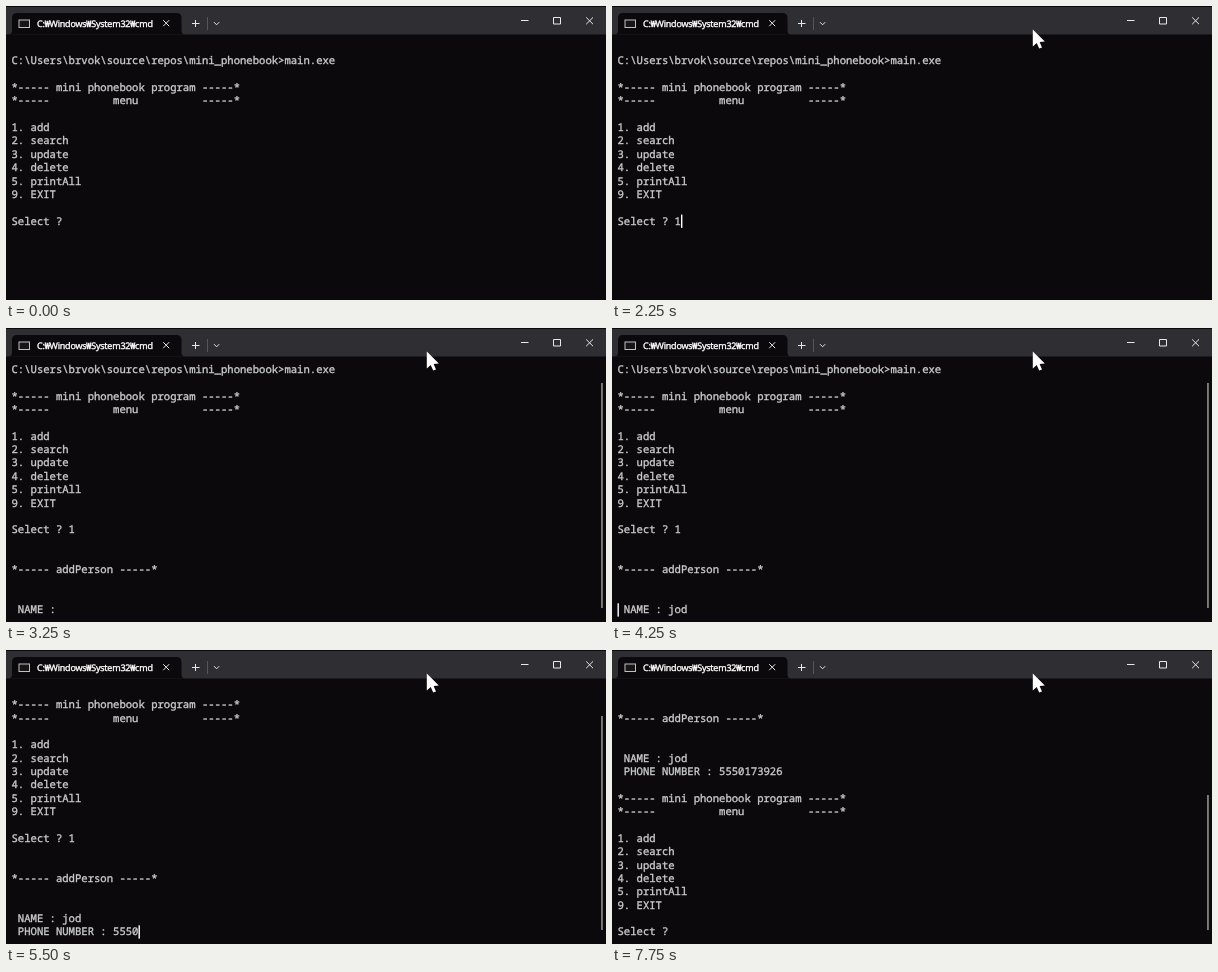
An HTML page that plays this animation: 600 by 294 pixels, repeating every 8000 ms.

```html
<!DOCTYPE html>
<html lang="en">
<head>
<meta charset="utf-8">
<title>Phonebook console</title>
<style>
  html, body { margin: 0; width: 100%; height: 100%; overflow: hidden; background: #0b090c; }
  svg { display: block; width: 600px; height: 294px; }
  text { white-space: pre; text-rendering: geometricPrecision; }
  #rows { font: 10.583px "Noto Sans Mono", "DejaVu Sans Mono", monospace; fill: #ccc; stroke: #ccc; stroke-width: .35; }
  #title { font: 9px "Open Sans", "Noto Sans CJK KR", "Noto Sans CJK", sans-serif; letter-spacing: -0.19px; fill: #fff; stroke: #fff; stroke-width: .4; }
  .line { fill: none; stroke: #e8e8e8; stroke-width: 1; }
</style>
</head>
<body>
<svg viewBox="0 0 600 294">
  <rect width="600" height="294" fill="#0b090c"/>
  <rect y="1" width="600" height="27.5" fill="#2f2e32"/>
  <path d="M2 28.5q4 0 4-4V12q0-5 5-5H170.5q5 0 5 5V24.5q0 4 4 4z" fill="#0b090c"/>
  <rect x="13" y="14" width="10.5" height="7.5" fill="#161616" stroke="#c0c0c0"/>
  <text id="title" x="31" y="20.7">C:₩Windows₩System32₩cmd</text>
  <path class="line" d="M157.2 14.2l6 6m0-6l-6 6M186 17.5h7.5M189.5 14v7M208 16.2l2.6 2.6l2.6-2.6"/>
  <path d="M201.5 11v13" stroke="#56555a"/>
  <path class="line" d="M515 14.5h7.5M547.5 11.5h7v6.5h-7zM580.2 11.4l6.8 6.8m0-6.8l-6.8 6.8"/>
  <g id="rows"></g>
  <rect id="bar" x="595.2" width="1.5" fill="#9c9c90"/>
  <rect id="caret" width="1.4" height="13.3" fill="#fff"/>
  <path id="mouse" d="M-.2-.4V16.6L3.7 13L6.2 18.6L9 17.4L6.6 12L11.8 11.6z" fill="#fff"/>
</svg>
<script>
  const LOOP = 8000, ROWS = 19, LEFT = 5.5, CELL_W = 6.35, CELL_H = 13.35, TOP = 35;
  const BASELINE = 10, BAR_END = 280;
  const person = 'jod', phone = '5550173926';
  const $ = id => document.getElementById(id);

  const menu = [
    '*----- mini phonebook program -----*',
    '*-----          menu          -----*',
    '', '1. add', '2. search', '3. update', '4. delete', '5. printAll', '9. EXIT', ''
  ];

  // Each cue changes part of the state; last = newest buffer line, caret = its column
  const cues = [
    [0, { last: 13, pick: '', name: 0, digits: 0, caret: null, mouse: null, bar: null }],
    [380, { caret: 9 }],
    [630, { mouse: [438, 18] }],
    [750, { mouse: [437, 20] }],
    [880, { mouse: [433, 22] }],
    [1000, { caret: null }],
    [1130, { mouse: [428, 24] }],
    [1250, { mouse: [421, 24] }],
    [1500, { caret: 9 }],
    [2000, { caret: null }],
    [2250, { pick: '1', caret: 10 }],
    [2380, { mouse: null }],
    [2630, { last: 19, caret: 8, bar: 55 }],
    [2750, { mouse: [421, 24] }],
    [3250, { caret: null }],
    [3880, { name: 1, caret: 9 }],
    [4000, { name: 2, caret: 10 }],
    [4130, { name: 3, caret: 11 }],
    [4250, { caret: 0 }],
    [4380, { last: 20, caret: 16, bar: 66 }],
    ...[4880, 5130, 5250, 5500, 5750, 6000, 6130, 6250].map((t, i) => [t, { digits: i + 1, caret: 17 + i }]),
    [6380, { digits: 10, caret: 26 }],
    [7000, { caret: null }],
    [7130, { last: 32, caret: 9, bar: 145 }],
    [7750, { caret: null }]
  ];

  const rows = Array.from({ length: ROWS }, (_, i) => {
    const row = document.createElementNS('http://www.w3.org/2000/svg', 'text');
    row.setAttribute('x', LEFT);
    row.setAttribute('y', TOP + BASELINE + i * CELL_H);
    return $('rows').appendChild(row);
  });

  const stateAt = t => Object.assign({}, ...cues.filter(c => c[0] <= t).map(c => c[1]));

  const linesOf = s => [
    '', 'C:\\Users\\brvok\\source\\repos\\mini_phonebook>main.exe', '',
    ...menu, 'Select ? ' + s.pick, '', '',
    '*----- addPerson -----*', '', '',
    ' NAME : ' + person.slice(0, s.name),
    ' PHONE NUMBER : ' + phone.slice(0, s.digits), '',
    ...menu, 'Select ? '
  ].slice(0, s.last + 1);

  function show(el, on, attrs) {
    el.setAttribute('visibility', on ? 'visible' : 'hidden');
    if (on) for (const k in attrs) el.setAttribute(k, attrs[k]);
  }

  function draw(t) {
    const s = stateAt(t), lines = linesOf(s);
    const scroll = Math.max(0, s.last + 1 - ROWS);
    rows.forEach((row, i) => {
      const line = lines[i + scroll] || '';
      if (row.textContent !== line) row.textContent = line;
    });
    show($('caret'), s.caret !== null, {
      x: LEFT + s.caret * CELL_W,
      y: TOP + (s.last - scroll) * CELL_H
    });
    show($('bar'), s.bar !== null, { y: s.bar, height: BAR_END - s.bar });
    show($('mouse'), s.mouse, { transform: `translate(${s.mouse})` });
  }

  const start = performance.now();
  function tick() {
    draw((performance.now() - start) % LOOP);
    requestAnimationFrame(tick);
  }
  tick();
</script>
</body>
</html>
```
